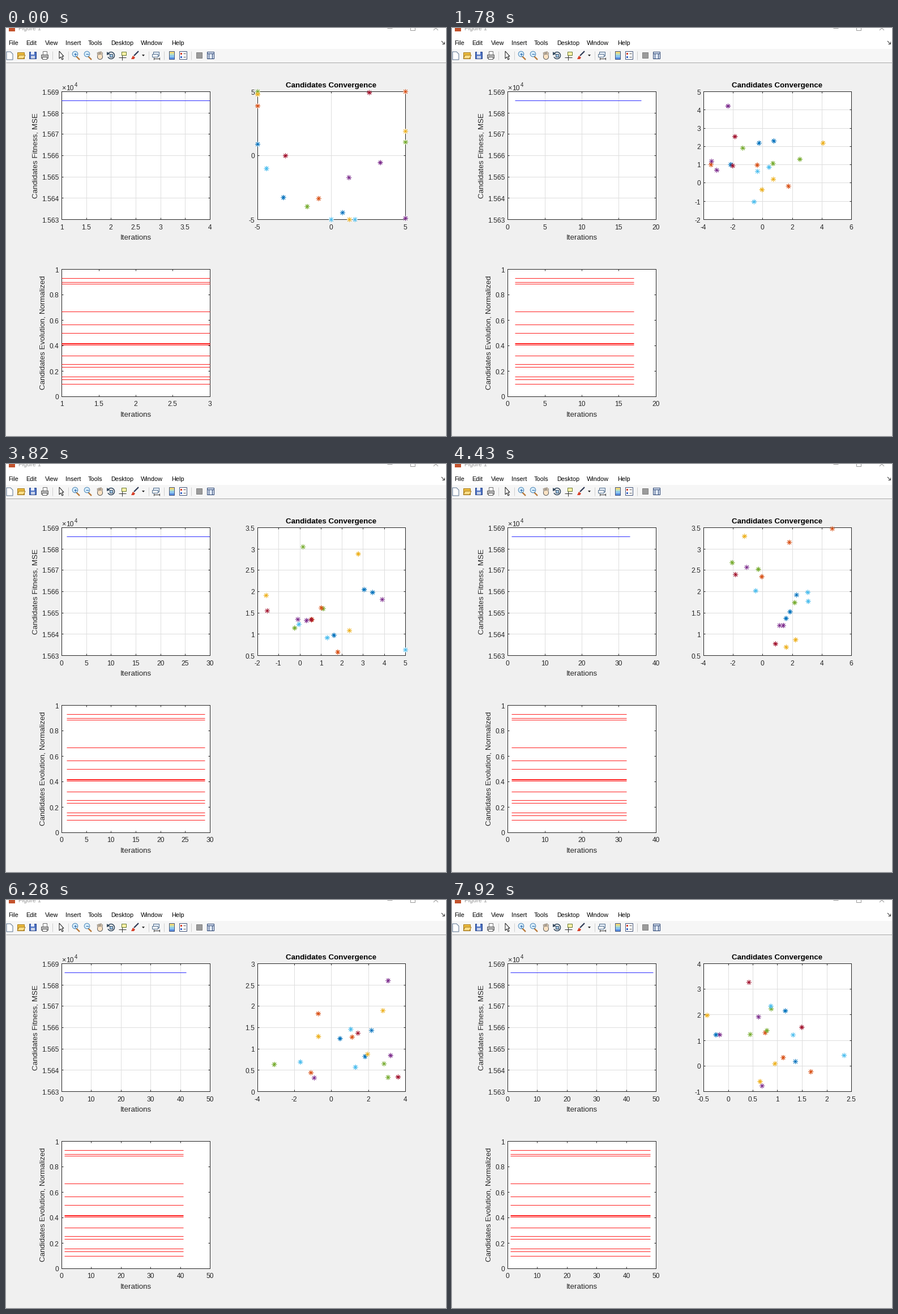
A matplotlib script for the animation above (8000 ms loop, 777 by 721 pixels).

```python
import math

import matplotlib.pyplot as plt
import numpy as np
from matplotlib.animation import FuncAnimation
from matplotlib.collections import LineCollection
from matplotlib.patches import Circle, Polygon, Rectangle

W, H, DPI = 777, 721, 64
PX = 72 / DPI                      # points per pixel
STEP, LOOP = 40, 8000
INK, GRID, PAPER = "#262626", "#dedede", "#f0f0f0"
COLORS = ["#0072bd", "#d95319", "#edb120", "#7e2f8e", "#77ac30", "#4dbeee", "#a2142f"]

fig = plt.figure(figsize=(W / DPI, H / DPI), dpi=DPI, facecolor=PAPER)
stage = fig.add_axes([0, 0, 1, 1])
stage.set_xlim(0, W)
stage.set_ylim(H, 0)
stage.axis("off")


# ---------- drawing helpers, all in pixels ----------
def text(x, y, s, size=12, color=INK, ha="center", va="baseline", **kw):
    return stage.text(x, y, s, fontsize=size * PX, color=color, ha=ha, va=va,
                      family="Liberation Sans", **kw)


def lines(segs, color, width=1.0, z=2):
    art = LineCollection(segs, colors=color, linewidths=width * PX, zorder=z)
    return stage.add_collection(art, autolim=False)


def rect(x, y, w, h, fill, edge="none", z=1, lw=1.0):
    return stage.add_patch(Rectangle((x, y), w, h, fc=fill, ec=edge, lw=lw * PX, zorder=z))


def poly(pts, fill, edge="none", z=2):
    return stage.add_patch(Polygon(pts, closed=True, fc=fill, ec=edge, lw=PX, zorder=z))


def disc(x, y, r, fill, edge="none", z=2):
    return stage.add_patch(Circle((x, y), r, fc=fill, ec=edge, lw=PX, zorder=z))


# ---------- window chrome ----------
def title_and_menu():
    rect(0, 0, W, 37, "white")
    rect(0, 37, W, 25, "#f6f6f6")
    rect(5, -5, 11, 11, "#c4532d")
    text(22, 4.5, "Figure 1", 10.7, "#9a9a9a", "left")
    lines([[(673, 0), (682, 0)], [(755, -4), (763, 4)], [(755, 4), (763, -4)]], "#9a9a9a")
    rect(714, -4, 8, 8, "none", "#9a9a9a", 2)
    names = "File Edit View Insert Tools Desktop Window Help".split()
    for x, name in zip((4, 35, 69, 105, 145, 185, 238, 292), names):
        text(x, 30, name, 10.9, "black", "left")
    lines([[(769, 23), (774, 28)], [(774, 24), (774, 28)], [(770, 28), (774, 28)]], "#333333")
    lines([[(0, 61), (W, 61)]], "#a8a8a8")
    lines([[(x, 41), (x, 56)] for x in (82, 110, 252, 279, 327)], "#d0d0d0")


def lens(x, plus):
    lines([[(x + 2, 50), (x + 8, 56)]], "#b97a3a", 2.4)
    disc(x, 46, 4.8, "#d9eefb", "#4a86b8", 3)
    lines([[(x - 2.5, 46), (x + 2.5, 46)]], "#1f5fa8", 1, 4)
    if plus:
        lines([[(x, 43.5), (x, 48.5)]], "#1f5fa8", 1, 4)


def toolbar():
    # new, open, save, print
    poly([(1, 42), (8, 42), (12, 46), (12, 56), (1, 56)], "white", "#5b7390")
    rect(20, 43, 12, 11, "#e9b93c", "#a87a1c", 2)
    poly([(20, 54), (23, 48), (34, 48), (31, 54)], "#fbe08a", "#a87a1c", 3)
    rect(41, 42, 12, 12, "#4a6fc0", "#29478c", 2)
    rect(44, 42, 6, 5, "#e8eefc", z=3)
    rect(44, 49, 7, 5, "#c6d0e8", z=3)
    rect(65, 41, 7, 6, "white", "#707070", 2)
    rect(62, 47, 12, 6, "#b8b8b8", "#606060", 3)
    rect(64, 51, 8, 4, "#f4f4f4", "#606060", 4)
    # pointer, zoom, pan
    poly([(94, 41), (94, 54), (97, 51), (99, 56), (101, 55), (99, 50), (102, 50)],
         "white", "#1a1a1a")
    lens(122, True)
    lens(143, False)
    fingers = [[(162 + 2.5 * i, 43 - i % 3), (163 + 2 * i, 50)] for i in range(4)]
    lines(fingers, "#5a5a5a", 2.6)
    disc(166, 51, 4.5, "#fbe3c4", "#5a5a5a")
    lines(fingers, "#fbe3c4", 1.2, 3)
    # rotate
    a = np.linspace(-2.6, 2.7, 24)
    lines([np.column_stack([185.5 + 6 * np.cos(a), 48.5 + 6 * np.sin(a)])], "#34495e", 1.6)
    poly([(178, 42), (178, 48), (184, 46)], "#34495e")
    rect(183, 46, 5, 5, "#9dc3e6", "#34495e", 3)
    # data tip, brush, caret
    lines([[(199, 52), (212, 52)], [(205, 46), (205, 57)]], "#333333")
    rect(204, 42, 8, 6, "#fff3a8", "#667a33", 3)
    lines([[(226, 49), (234, 41)]], "#303a55", 2.2, 3)
    poly([(221, 55), (224, 49), (228, 52), (226, 55)], "#d8402a", z=3)
    poly([(240, 47), (245, 47), (242.5, 50)], "#222222")
    # link, colour bar, legend
    rect(260, 42, 10, 7, "#e4edf7", "#4f6b8a", 2)
    rect(258, 46, 10, 5, "#f6f9fc", "#4f6b8a", 3)
    lines([[(261, 54), (271, 54)], [(261, 52), (261, 56)], [(271, 52), (271, 56)]], "#333333")
    for i, c in enumerate(("#f2d97a", "#b9e0c0", "#8cc6f0", "#5a8ee0")):
        rect(288, 41 + 3.5 * i, 9, 3.5, c)
    rect(288, 41, 9, 14, "none", "#44557a", 2)
    rect(306, 41, 13, 14, "white", "#44557a", 2)
    for y, c in ((45, "#d8402a"), (51, "#3a66c8")):
        rect(308, y - 1, 3, 3, c, z=3)
        lines([[(313, y), (317, y)]], "#555555", 1, 3)
    # tools off / on
    rect(336, 43, 10, 10, "#9b9b9b", "#828282", 2)
    rect(355, 42, 12, 12, "#dfe8f6", "#27406e", 2)
    lines([[(355, 45), (367, 45)], [(358, 45), (358, 54)], [(364, 45), (364, 54)]],
          "#27406e", 1, 3)


# ---------- plots ----------
def nice(lo, hi, most):
    """Tightest round limits and tick step with at most `most` intervals."""
    found = []
    for step in (m * 10.0 ** e for e in (-1, 0, 1) for m in (1, 2, 5)):
        a, b = math.floor(lo / step + 1e-9), math.ceil(hi / step - 1e-9)
        if 1 <= b - a <= most:
            found.append((round((b - a) * step, 6), step, a, b))
    _, step, a, b = min(found)
    return np.arange(a, b + 1) * step


class Plot:
    def __init__(self, x0, y0, x1, y1, grid):
        self.box, self.grid = (x0, y0, x1, y1), grid
        rect(x0, y0, x1 - x0, y1 - y0, "white", z=1)
        rect(x0, y0, x1 - x0, y1 - y0, "none", INK, 5)

    def to_px(self, x, y):
        x0, y0, x1, y1 = self.box
        u = (np.asarray(x) - self.xt[0]) / (self.xt[-1] - self.xt[0])
        v = (np.asarray(y) - self.yt[0]) / (self.yt[-1] - self.yt[0])
        return x0 + u * (x1 - x0), y1 - v * (y1 - y0)

    def scale(self, xt, yt):
        """Set the limits and draw grid, ticks and tick labels."""
        self.xt, self.yt = xt, yt
        x0, y0, x1, y1 = self.box
        px = np.round(self.to_px(xt, yt[0])[0])
        py = np.round(self.to_px(xt[0], yt)[1])
        out, ticks = [], []
        for x in px:
            ticks += [[(x, y1), (x, y1 - 3)], [(x, y0), (x, y0 + 3)]]
        for y in py:
            ticks += [[(x0, y), (x0 + 3, y)], [(x1, y), (x1 - 3, y)]]
        out.append(lines(ticks, INK, 1, 5))
        if self.grid:
            mesh = [[(x, y0), (x, y1)] for x in px[1:-1]]
            mesh += [[(x0, y), (x1, y)] for y in py[1:-1]]
            out.append(lines(mesh, GRID))
        for x, v in zip(px, xt):
            out.append(text(x, y1 + 17.5, f"{round(v, 6) + 0:g}"))
        for y, v in zip(py, yt):
            out.append(text(x0 - 5, y + 5.5, f"{round(v, 6) + 0:g}", ha="right"))
        return out

    def levels(self, end, values, color):
        segs = []
        for v in values:
            x, y = self.to_px([1, end], [v, v])
            segs.append(list(zip(x, np.round(y))))
        return lines(segs, color, 1, 6)


title_and_menu()
toolbar()
fitness = Plot(98, 112, 360, 338, True)
spread = Plot(444, 112, 705, 338, True)
evolution = Plot(98, 426, 360, 651, False)

for bottom in (338, 651):
    text(229.5, bottom + 36, "Iterations", 13.33)
for x, y, label in ((53, 225.5, "Candidates Fitness, MSE"),
                    (65.5, 538, "Candidates Evolution, Normalized")):
    text(x, y, label, 13.33, rotation=90, va="center")
text(574.5, 105.5, "Candidates Convergence", 13.33, "black", weight="bold")
text(98.5, 109.5, "×", 12.5, ha="left")
text(106.5, 109.5, "10", ha="left")
text(121, 104.5, "4", 9.6, ha="left")

BEST = 1.56858
LEVELS = [.927, .896, .884, .666, .563, .497, .419, .413, .404, .321,
          .253, .232, .156, .134, .097]

# Reach of the swarm at a few iterations: n, x from, x to, y from, y to.
REACH = np.array([(4, -5, 5, -5, 5), (12, -4.6, 5, -1.04, 4.7), (23, -2.6, 3.3, -1.02, 3.8),
                  (30, -1.6, 5, .58, 3.05), (37, -2.7, 4.3, .85, 4.04),
                  (42, -3.1, 3.6, .32, 2.6), (49, -.43, 2.35, -.78, 3.27)]).T
SWARM = 20
DOTS = [COLORS[i % 7] for i in range(SWARM)]


def candidates(n):
    """A fresh scatter per iteration; early ones pile up on the borders."""
    rng = np.random.default_rng(n)
    x0, x1, y0, y1 = (np.interp(n, REACH[0], row) for row in REACH[1:])

    def draw(lo, hi):
        v = np.clip(rng.normal(size=SWARM), -n / 4, n / 4)
        return lo + (hi - lo) * (v - v.min()) / np.ptp(v)

    return draw(x0, x1), draw(y0, y1)


live = []
shown = None


def show(n):
    while live:
        live.pop().remove()
    live.extend(fitness.scale(nice(1, n, 6), np.linspace(1.563, 1.569, 7)))
    live.append(fitness.levels(n, [BEST], "#3030ff"))
    live.extend(evolution.scale(nice(1, n - 1, 6), np.linspace(0, 1, 6)))
    live.append(evolution.levels(n - 1, LEVELS, "#ff2020"))

    xs, ys = candidates(n)
    live.extend(spread.scale(nice(xs.min(), xs.max(), 7), nice(ys.min(), ys.max(), 8)))
    x, y = spread.to_px(xs, ys)
    live.append(stage.scatter(x + 0.5, y + 0.5, s=(8.4 * PX) ** 2, c=DOTS, marker=(8, 2, 0),
                              linewidths=0.75 * PX, clip_on=False, zorder=7))


def iteration(t):
    """Each step takes a little longer: t = 40 + 112 m + 1.52 m^2, solved for m."""
    a, b = 112, 1.52
    return 5 + math.floor((math.sqrt(a * a + 4 * b * (t - 40)) - a) / (2 * b))


def update(k):
    global shown
    n = iteration(k * STEP + 30)
    if n != shown:
        show(n)
        shown = n
    return live


anim = FuncAnimation(fig, update, frames=LOOP // STEP, interval=STEP,
                     repeat=True, repeat_delay=0, blit=False)
plt.show()
```
